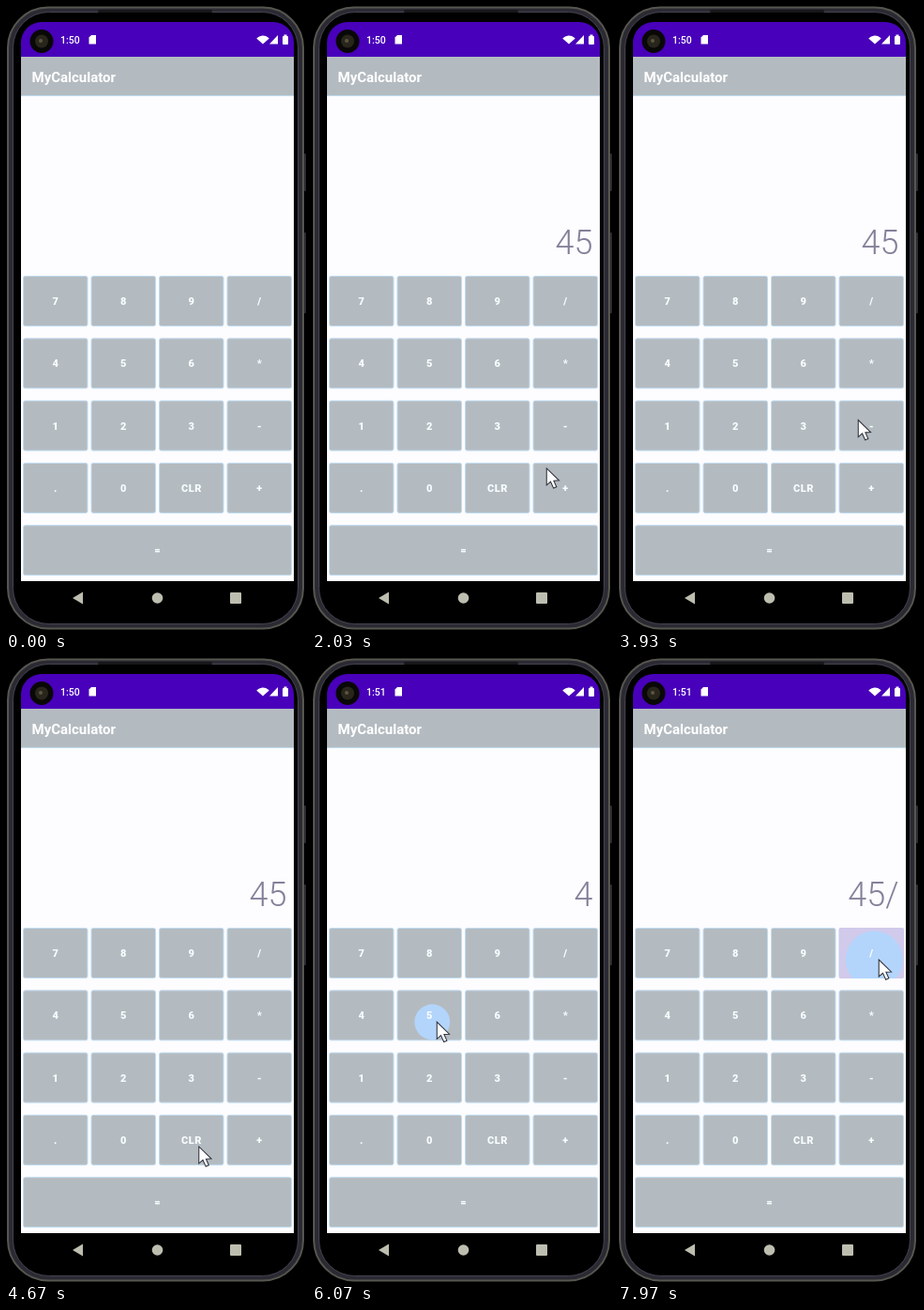
An HTML page with a canvas for the animation above (8000 ms loop, 320 by 664 pixels).

```html
<!DOCTYPE html>
<html lang="en">
<head>
<meta charset="utf-8">
<title>Calculator</title>
<style>
html, body { margin: 0; width: 100%; height: 100%; overflow: hidden; background: #000; }
canvas { display: block; width: 320px; height: 664px; }
</style>
</head>
<body>
<canvas id="stage"></canvas>
<script>
const W = 320, H = 664, LOOP = 8000;
const canvas = document.getElementById('stage');
const ctx = canvas.getContext('2d');
const dpr = window.devicePixelRatio || 1;
canvas.width = W * dpr;
canvas.height = H * dpr;
ctx.scale(dpr, dpr);

const GREY = '#b4bbc0', EDGE = '#bfdcf2', PAPER = '#fdfcfe', PURPLE = '#4800ba';
const RIPPLE = '#b3d5fc', HELD = '#d1caeb', ICON = '#bebeb0';
const FONT = 'Roboto, "Open Sans", sans-serif';
const SCREEN = { x: 16, y: 17, w: 291, h: 630 };

// Four by four keypad with a wide key below
const KEY_W = 69.5, KEY_H = 54, STEP_X = 72.5, STEP_Y = 66.3;
const LABELS = ['7', '8', '9', '/', '4', '5', '6', '*', '1', '2', '3', '-', '.', '0', 'CLR', '+', '='];
const keys = LABELS.map((label, i) => {
  const x = 18 + (i % 4) * STEP_X, y = 287 + Math.floor(i / 4) * STEP_Y;
  const w = label === '=' ? 3 * STEP_X + KEY_W : KEY_W;
  return { label, x, y, w, cx: x + w / 2, cy: y + KEY_H / 2 };
});
const keyFor = label => keys.find(k => k.label === label);

// Where the pointer goes: arrival time, stay, offset from the key centre
const visits = [
  { key: '.', at: 330, dx: -18, dy: 152 },
  { key: '4', at: 800, stay: 200, tap: true },
  { key: '5', at: 1220, stay: 340, tap: true },
  { key: '+', at: 2030, dx: -20, dy: -21 },
  { key: '+', at: 2730, stay: 140, dx: 11, dy: -14 },
  { key: '+', at: 3100, stay: 170, dx: 19, dy: -7 },
  { key: '*', at: 3600, dx: 0, dy: -14 },
  { key: '-', at: 3930, stay: 250, dx: -14, dy: -6 },
  { key: 'CLR', at: 4600, stay: 280, tap: true },
  { key: '4', at: 5340, stay: 200, tap: true },
  { key: '5', at: 5900, stay: 340, tap: true },
  { key: '-', at: 6900, dx: 11, dy: -10 },
  { key: '/', at: 7580, stay: 420, tap: true }
].map(({ key, at, stay = 0, dx = 8, dy = 7, tap }) => {
  const k = keyFor(key);
  return { key: k, at, leave: at + stay, x: k.cx + dx, y: k.cy + dy, tap };
});

const TAP_DELAY = 140, RELEASE = 210;
const taps = visits.filter(v => v.tap).map(v => ({ key: v.key, at: v.at + TAP_DELAY }));

const clamp = v => Math.min(1, Math.max(0, v));
const smooth = v => v * v * (3 - 2 * v);
const mix = (a, b, k) => a + (b - a) * k;

function rect(x, y, w, h, fill) {
  ctx.fillStyle = fill;
  ctx.fillRect(x, y, w, h);
}

function box(x, y, w, h, r, fill, stroke, line = 1) {
  ctx.beginPath();
  ctx.roundRect(x, y, w, h, r);
  if (fill) { ctx.fillStyle = fill; ctx.fill(); }
  if (stroke) { ctx.strokeStyle = stroke; ctx.lineWidth = line; ctx.stroke(); }
}

function disc(x, y, r, fill) {
  ctx.beginPath();
  ctx.arc(x, y, r, 0, Math.PI * 2);
  ctx.fillStyle = fill;
  ctx.fill();
}

function poly(points, fill, stroke) {
  ctx.beginPath();
  points.forEach(([x, y]) => ctx.lineTo(x, y));
  ctx.closePath();
  ctx.fillStyle = fill;
  ctx.fill();
  if (stroke) { ctx.strokeStyle = stroke; ctx.lineWidth = 1; ctx.stroke(); }
}

function text(str, x, y, size, weight, fill, align = 'left') {
  ctx.font = `${weight} ${size}px ${FONT}`;
  ctx.textAlign = align;
  ctx.fillStyle = fill;
  ctx.fillText(str, x, y);
}

function drawPhone() {
  rect(0, 0, W, H, '#000');
  for (const [y, h] of [[157, 40], [241, 86]]) box(317, y, 3, h, 1, '#2d2c33');
  box(2, 1.5, 315, 661, 43, '#2b2a33', '#57564f', 2);
  box(7.5, 6.5, 304, 651, 38, '#000', '#45434f');
  box(98, 4, 122, 3, 1.5, '#17171a');
}

function drawStatus(t) {
  rect(SCREEN.x, SCREEN.y, SCREEN.w, 37, PURPLE);
  disc(38, 37.5, 12.5, '#090807');
  disc(38, 37.5, 7, '#28261b');
  disc(37, 37, 2, '#5b5540');
  text(t < 6000 ? '1:50' : '1:51', 58, 39.5, 10.5, 500, '#fff');
  poly([[91, 31], [96, 31], [96, 40.5], [88.5, 40.5], [88.5, 33.5]], '#fff');
  ctx.beginPath();
  ctx.moveTo(274, 40.5);
  ctx.arc(274, 40.5, 9, -Math.PI * 0.77, -Math.PI * 0.23);
  ctx.fill();
  poly([[290, 31], [290, 40.5], [281, 40.5]], '#fff');
  box(295, 32, 6, 9, 1, '#fff');
  rect(296.5, 30.5, 3, 2, '#fff');
}

function drawNav() {
  poly([[71, 630], [82, 623.5], [82, 636.5]], ICON);
  disc(161.5, 630, 5.8, ICON);
  box(239, 624, 12, 12, 1, ICON);
}

function drawRipple(key, age) {
  ctx.save();
  ctx.beginPath();
  ctx.roundRect(key.x, key.y, key.w, KEY_H, 2);
  ctx.clip();
  ctx.globalAlpha = 1 - clamp((age - 300) / 220);
  if (age >= RELEASE) rect(key.x, key.y, key.w, KEY_H, HELD);
  const grow = 1 - (1 - clamp(age / 150)) ** 2;
  disc(key.cx + 3, key.cy + 7, mix(12, 30.5, grow), RIPPLE);
  ctx.restore();
}

function drawKey(key, t) {
  box(key.x + 0.5, key.y + 0.5, key.w - 1, KEY_H - 1, 2, GREY, EDGE);
  taps.filter(p => p.key === key && t >= p.at).forEach(p => drawRipple(key, t - p.at));
  ctx.letterSpacing = '0.5px';
  text(key.label, key.cx + 0.25, key.y + 31, 11, 900, '#f8fdff', 'center');
  ctx.letterSpacing = '0px';
}

function entry(t) {
  return taps.filter(p => t >= p.at + RELEASE)
    .reduce((s, { key }) => key.label === 'CLR' ? '' : s + key.label, '');
}

function drawPointer(t) {
  if (t < visits[0].at) return;
  const i = visits.findLastIndex(v => v.at <= t);
  const from = visits[i], to = visits[i + 1] || from;
  const k = smooth(clamp((t - from.leave) / (to.at - from.leave || 1)));
  ctx.save();
  ctx.translate(mix(from.x, to.x, k), mix(from.y, to.y, k));
  ctx.scale(1.06, 1.06);
  poly([[0, 0], [0, 17], [4, 13.5], [7, 20], [10, 18.7], [7.2, 12.5], [12.5, 12.2]],
    '#fff', '#30323c');
  ctx.restore();
}

function draw(t) {
  drawPhone();
  ctx.save();
  ctx.beginPath();
  ctx.roundRect(SCREEN.x, SCREEN.y, SCREEN.w, SCREEN.h, 22);
  ctx.clip();
  drawStatus(t);
  rect(SCREEN.x, 54, SCREEN.w, 558, PAPER);
  rect(SCREEN.x, 54, SCREEN.w, 41, GREY);
  rect(SCREEN.x, 95, SCREEN.w, 1, EDGE);
  text('MyCalculator', 27.5, 80.5, 15, 700, '#fff');
  text(entry(t), 299.5, 264, 36, 300, '#85809a', 'right');
  keys.forEach(key => drawKey(key, t));
  drawNav();
  ctx.restore();
  drawPointer(t);
}

const began = performance.now();
function tick() {
  draw((performance.now() - began) % LOOP);
  requestAnimationFrame(tick);
}
tick();
</script>
</body>
</html>
```
